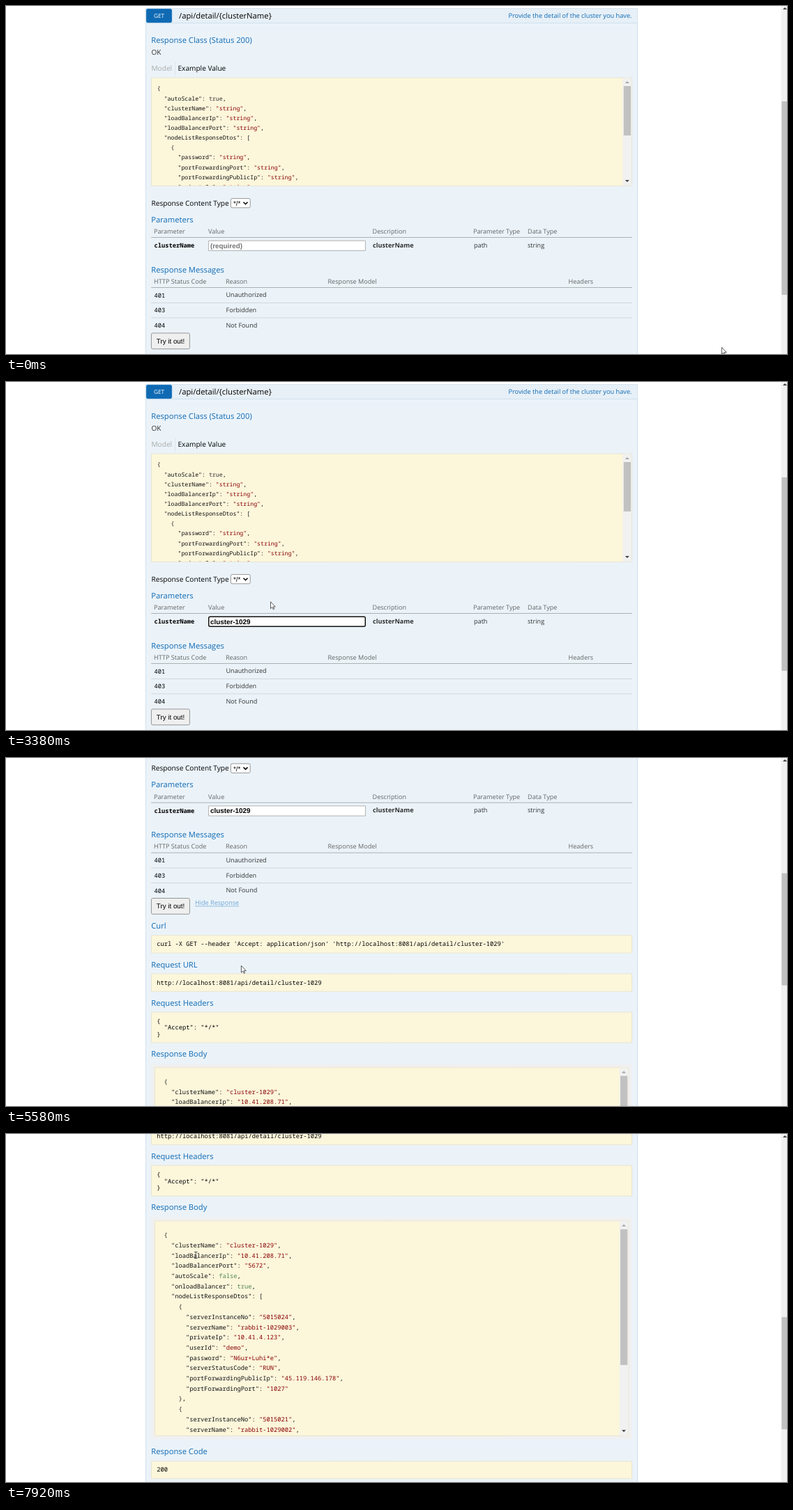
Write an HTML page with a canvas that moves like this. It is 1120 px wide and 500 px high and loops after 7.99 s.

```html
<!DOCTYPE html>
<html lang="en">
<head>
<meta charset="utf-8">
<title>API explorer</title>
<style>
  html, body { margin: 0; width: 100%; height: 100%; overflow: hidden; background: #fff; }
  canvas { display: block; }
</style>
</head>
<body>
<canvas id="stage" width="1120" height="500"></canvas>
<script>
const ctx = document.getElementById('stage').getContext('2d');
ctx.textRendering = 'geometricPrecision';

const LOOP = 7990;
const PX = 0.7354; // one page pixel on the stage
const SANS = '"Open Sans", sans-serif';
const MONO = '"Noto Sans Mono", monospace';
const ARIAL = '"Liberation Sans", Arial, sans-serif';
const BLUE = '#0f6ab4', CREAM = '#fcf6db', CREAM_EDGE = '#e5e0c6';

const NAME = 'cluster-1029';
const KEY_TIMES = [1360, 1430, 1600, 1680, 1750, 1830, 1980, 2070, 2220, 2300, 2380, 2530];
const SUGGESTIONS = [NAME, 'cluster-1032', 'cluster-1400014'];
const FOCUS = 510, CLICK = 4450, REVEAL = 4795;

// Keyframes: time, then one or more values
const POINTER = [
  [70, 1026, 490], [510, 402, 345], [590, 402, 343], [730, 398, 333], [3250, 398, 333],
  [3600, 338, 277], [4090, 236, 484], [CLICK, 236, 484], [4880, 203, 360], [5280, 337, 298],
  [5600, 337, 298], [5800, 283, 278], [6850, 283, 278], [7080, 926, 328], [7225, 926, 328],
  [7530, 414, 272], [7920, 272, 174]
];
const NOTCH = 100 * PX;
const PAGE_SCROLL = [[5274, 0], [5810, 6 * NOTCH], [7146, 6 * NOTCH], [7485, 8 * NOTCH]];
const BODY_SCROLL = [[5860, 0], [6521, 143], [6560, 143], [6850, 0]];

const SAMPLE = `{
  "autoScale": true,
  "clusterName": "string",
  "loadBalancerIp": "string",
  "loadBalancerPort": "string",
  "nodeListResponseDtos": [
    {
      "password": "string",
      "portForwardingPort": "string",
      "portForwardingPublicIp": "string",
      "privateIp": "string",`.split('\n');

const node = (id, server, ip, password, port) => ({
  serverInstanceNo: id, serverName: server, privateIp: ip, userId: 'demo', password,
  serverStatusCode: 'RUN', portForwardingPublicIp: '45.119.146.178', portForwardingPort: port
});
const RESPONSE = JSON.stringify({
  clusterName: NAME, loadBalancerIp: '10.41.208.71', loadBalancerPort: '5672',
  autoScale: false, onloadBalancer: true,
  nodeListResponseDtos: [
    node('5015024', 'rabbit-1029003', '10.41.4.123', 'N6ur+Luhi*e', '1027'),
    node('5015021', 'rabbit-1029002', '10.41.4.122', 'T4kd+Bavo*s', '1028')
  ]
}, null, 2).split('\n');

const smooth = p => (p = Math.min(1, Math.max(0, p)), p * p * (3 - 2 * p));

function sample(keys, t) {
  const i = keys.findIndex(k => k[0] > t);
  if (i < 0) return keys[keys.length - 1].slice(1);
  if (i === 0) return keys[0].slice(1);
  const a = keys[i - 1], b = keys[i], p = smooth((t - a[0]) / (b[0] - a[0]));
  return a.slice(1).map((v, n) => v + (b[n + 1] - v) * p);
}

// y is the middle of the capitals; returns the text width
function text(str, x, y, { size = 9.1, color = '#333', font = SANS, weight = '', align = 'left' } = {}) {
  ctx.font = `${weight} ${size}px ${font}`;
  ctx.fillStyle = color;
  ctx.textAlign = align;
  ctx.fillText(str, x, y + size * 0.36);
  return ctx.measureText(str).width;
}
const heading = (str, y) => text(str, 208.3, y, { size: 11.2, color: BLUE });
const mono = (str, x, y, weight) => text(str, x, y, { size: 8.76, color: '#000', font: MONO, weight });

function rect(x, y, w, h, color) {
  ctx.fillStyle = color;
  ctx.fillRect(x, y, w, h);
}
const rule = (y, color) => rect(208.1, y, 689.8, PX, color);

function box(x, y, w, h, fill, stroke, radius = 0, line = PX) {
  ctx.beginPath();
  ctx.roundRect(x + line / 2, y + line / 2, w - line, h - line, radius);
  ctx.fillStyle = fill;
  ctx.fill();
  ctx.strokeStyle = stroke;
  ctx.lineWidth = line;
  ctx.stroke();
}
const block = (y, h) => box(208.1, y, 689.8, h, CREAM, CREAM_EDGE);

function clipped(x, y, w, h, draw) {
  ctx.save();
  ctx.beginPath();
  ctx.rect(x, y, w, h);
  ctx.clip();
  draw();
  ctx.restore();
}

function json(lines, x, y, pitch, size, literal) {
  lines.forEach((line, i) => {
    const [, key = '', value, comma] = line.match(/^( *"\w+": )?(.*?)(,?)$/);
    const color = value[0] === '"' ? '#880000' : /true|false/.test(value) ? literal : '#222';
    let left = x;
    for (const [part, tint] of [[key, '#111'], [value, color], [comma, '#111']])
      left += text(part, left, y + i * pitch, { size, color: tint, font: MONO });
  });
}

function arrow(x, y, dir, enabled) {
  ctx.fillStyle = enabled ? '#404040' : '#a3a3a3';
  ctx.beginPath();
  ctx.moveTo(x - 3, y + 1.5 * dir);
  ctx.lineTo(x + 3, y + 1.5 * dir);
  ctx.lineTo(x, y - 1.5 * dir);
  ctx.fill();
}

function scrollbar(x, y, h, thumbY, thumbH, up, down) {
  rect(x, y, 17 * PX, h, '#f1f1f1');
  rect(x + 1.2, thumbY, 10.2, thumbH, '#c1c1c1');
  arrow(x + 6.2, y + 6, 1, up);
  arrow(x + 6.2, y + h - 6.5, -1, down);
}

function operation() {
  rect(200, 3, 706, 1200, '#c3d9ec');
  rect(200 + PX, 3 + PX, 706 - 2 * PX, 1200, '#ebf3f9');
  rect(200 + PX, 3 + PX, 706 - 2 * PX, 20.3, '#e7f0f7');
  rect(200 + PX, 24, 706 - 2 * PX, PX, '#c3d9ec');
  box(201, 4, 37, 20, BLUE, BLUE, 2);
  text('GET', 219.5, 14.5, { size: 8.3, color: '#fff', align: 'center' });
  text('/api/detail/{clusterName}', 248, 14, { size: 11.25, color: '#000' });
  text('Provide the detail of the cluster you have.', 897.5, 13.5, { size: 9.2, color: BLUE, align: 'right' });

  heading('Response Class (Status 200)', 48.5);
  text('OK', 208.5, 66, { size: 10.1 });
  text('Model', 208.5, 89.5, { size: 10.1, color: '#aaa' });
  rect(242, 80, PX, 20, '#ddd');
  text('Example Value', 246.5, 89.5, { size: 10.1, color: '#000' });

  block(102.8, 156);
  clipped(209, 104, 675, 154, () => json(SAMPLE, 216.8, 118.5, 14.13, 8.24, '#333'));
  scrollbar(884.6, 103.6, 154.4, 115, 71, false, true);

  text('Response Content Type', 208.5, 283, { size: 10.14, color: '#000' });
  box(322, 276.2, 28.6, 14, '#fff', '#767676', 2);
  text('*/*', 326, 283.5, { size: 9.8, color: '#000', font: ARIAL });
  ctx.beginPath();
  ctx.moveTo(340.5, 281.8);
  ctx.lineTo(343.5, 284.8);
  ctx.lineTo(346.5, 281.8);
  ctx.strokeStyle = '#000';
  ctx.lineWidth = 1.5;
  ctx.stroke();

  const columns = (y, cells) => cells.forEach(([str, x]) => text(str, x, y, { color: '#666' }));
  heading('Parameters', 306.5);
  columns(324, [['Parameter', 212], ['Value', 290], ['Description', 525.5], ['Parameter Type', 670], ['Data Type', 748]]);
  rule(332.2, '#999');
  mono('clusterName', 212.5, 344, 'bold');
  text('clusterName', 526, 343.5, { weight: 'bold' });
  text('path', 671, 343.5);
  text('string', 748, 343.5);

  heading('Response Messages', 378.5);
  columns(395.5, [['HTTP Status Code', 212], ['Reason', 315], ['Response Model', 461.5], ['Headers', 806.5]]);
  rule(404.2, '#999');
  [['401', 'Unauthorized'], ['403', 'Forbidden'], ['404', 'Not Found']].forEach(([status, reason], i) => {
    const y = 415 + i * 21.75;
    mono(status, 212.5, y + 0.5);
    text(reason, 315.5, y);
    if (i < 2) rule(426 + i * 21.6, '#ccc');
  });
  box(208.1, 469.6, 55.7, 23.5, '#efefef', '#767676', 2);
  text('Try it out!', 236, 481, { size: 9.8, color: '#000', font: ARIAL, align: 'center' });
}

function response(t, scroll) {
  if (t < REVEAL) return;
  const width = text('Hide Response', 271, 476.5, { color: '#6fa5d3' });
  rect(271, 481, width, PX, '#6fa5d3');

  heading('Curl', 509.5);
  block(522.9, 26);
  mono(`curl -X GET --header 'Accept: application/json' 'http://localhost:8081/api/detail/${NAME}'`, 216.2, 535.6);
  heading('Request URL', 565);
  block(578.1, 26);
  mono(`http://localhost:8081/api/detail/${NAME}`, 216.2, 590.8);
  heading('Request Headers', 620);
  block(633.2, 44.6);
  ['{', '  "Accept": "*/*"', '}'].forEach((line, i) => mono(line, 216.2, 646.4 + i * 9.3));

  heading('Response Body', 693.7);
  rect(208.1, 708, 689.8, 319, '#f0f0f0');
  box(213, 712.9, 680, 309.4, CREAM, CREAM_EDGE);
  clipped(214, 713.6, 666, 308, () => json(RESPONSE, 226.4, 733.3, 20 * PX, 8.76, '#4f8a4f'), ctx.save());
}

function responseBody(scroll) {
  clipped(214, 713.6, 666, 308, () => json(RESPONSE, 226.4, 733.3 - scroll, 20 * PX, 8.76, '#4f8a4f'));
  scrollbar(879.8, 713.6, 308, 725.2 + scroll * 0.63, 195, scroll > 0.5, scroll < 142.5);
}

response = (t, scroll) => {
  if (t < REVEAL) return;
  const width = text('Hide Response', 271, 476.5, { color: '#6fa5d3' });
  rect(271, 481, width, PX, '#6fa5d3');

  heading('Curl', 509.5);
  block(522.9, 26);
  mono(`curl -X GET --header 'Accept: application/json' 'http://localhost:8081/api/detail/${NAME}'`, 216.2, 535.6);
  heading('Request URL', 565);
  block(578.1, 26);
  mono(`http://localhost:8081/api/detail/${NAME}`, 216.2, 590.8);
  heading('Request Headers', 620);
  block(633.2, 44.6);
  ['{', '  "Accept": "*/*"', '}'].forEach((line, i) => mono(line, 216.2, 646.4 + i * 9.3));

  heading('Response Body', 693.7);
  rect(208.1, 708, 689.8, 319, '#f0f0f0');
  box(213, 712.9, 680, 309.4, CREAM, CREAM_EDGE);
  responseBody(scroll);

  heading('Response Code', 1044);
  block(1058.2, 25.5);
  mono('200', 216.2, 1070.4);
};

function field(t) {
  const count = KEY_TIMES.filter(k => k <= t).length;
  const value = NAME.slice(0, count);
  const focused = t >= FOCUS && t < CLICK;
  if (focused) box(290, 336.5, 226, 15.5, '#fff', '#101010', 2, 2 * PX);
  else box(290.2, 336.9, 225.6, 15, '#fff', '#999');

  const style = { size: 9.85, font: ARIAL, weight: 'bold', color: '#000' };
  if (!count) text('(required)', 293, 344, { ...style, color: '#757575' });
  const width = text(value, 293, 344, style);
  const since = t - (count ? KEY_TIMES[count - 1] : FOCUS);
  if (focused && Math.floor(since / 530) % 2 === 0) rect(293 + width, 339, PX, 11, '#000');

  if (count < 2 || count === NAME.length) return;
  const matches = SUGGESTIONS.filter(s => s.startsWith(value));
  ctx.save();
  ctx.shadowColor = 'rgba(0,0,0,.3)';
  ctx.shadowBlur = 3;
  ctx.shadowOffsetY = 1;
  rect(290, 352, 227, 11 + matches.length * 26.6, '#fff');
  ctx.restore();
  matches.forEach((s, i) => text(s, 299, 371.5 + i * 26.5, { size: 9.3, color: '#444' }));
}

function pointer(t) {
  const [x, y] = sample(POINTER, t);
  const overText = (t > 490 && t < 600) || (t > 5700 && t < 6900) || t > 7490;
  ctx.save();
  ctx.translate(x, y);
  ctx.lineWidth = PX;
  ctx.strokeStyle = '#222';
  ctx.fillStyle = '#fff';
  if (overText) {
    ctx.stroke(new Path2D('M-2-4.5H2.5M.2-4.5V4.5M-2 4.5H2.5'));
  } else {
    const shape = new Path2D('M.4.4V10.2L2.7 8.1L4.2 11.4L5.6 10.8L4.2 7.6H7.2Z');
    ctx.fill(shape);
    ctx.stroke(shape);
  }
  ctx.restore();
}

function pageScrollbar(t, scroll) {
  // The thumb shrinks as the page grows with the response
  const grow = smooth((t - REVEAL) / 300);
  const height = 1 / (1 / 278 + (1 / 161 - 1 / 278) * grow);
  rect(1111.6, 0, 9, 500, '#f1f1f1');
  rect(1112.4, 10.5 + height * 0.455 + scroll * 0.305, 8, height, '#c1c1c1');
  arrow(1117, 3.5, 1, true);
}

function frame() {
  const t = performance.now() % LOOP;
  const [scroll] = sample(PAGE_SCROLL, t);
  rect(0, 0, 1120, 500, '#fff');
  ctx.save();
  ctx.translate(0, -scroll);
  operation();
  response(t, sample(BODY_SCROLL, t)[0]);
  field(t);
  ctx.restore();
  pageScrollbar(t, scroll);
  pointer(t);
  requestAnimationFrame(frame);
}
requestAnimationFrame(frame);
</script>
</body>
</html>
```
